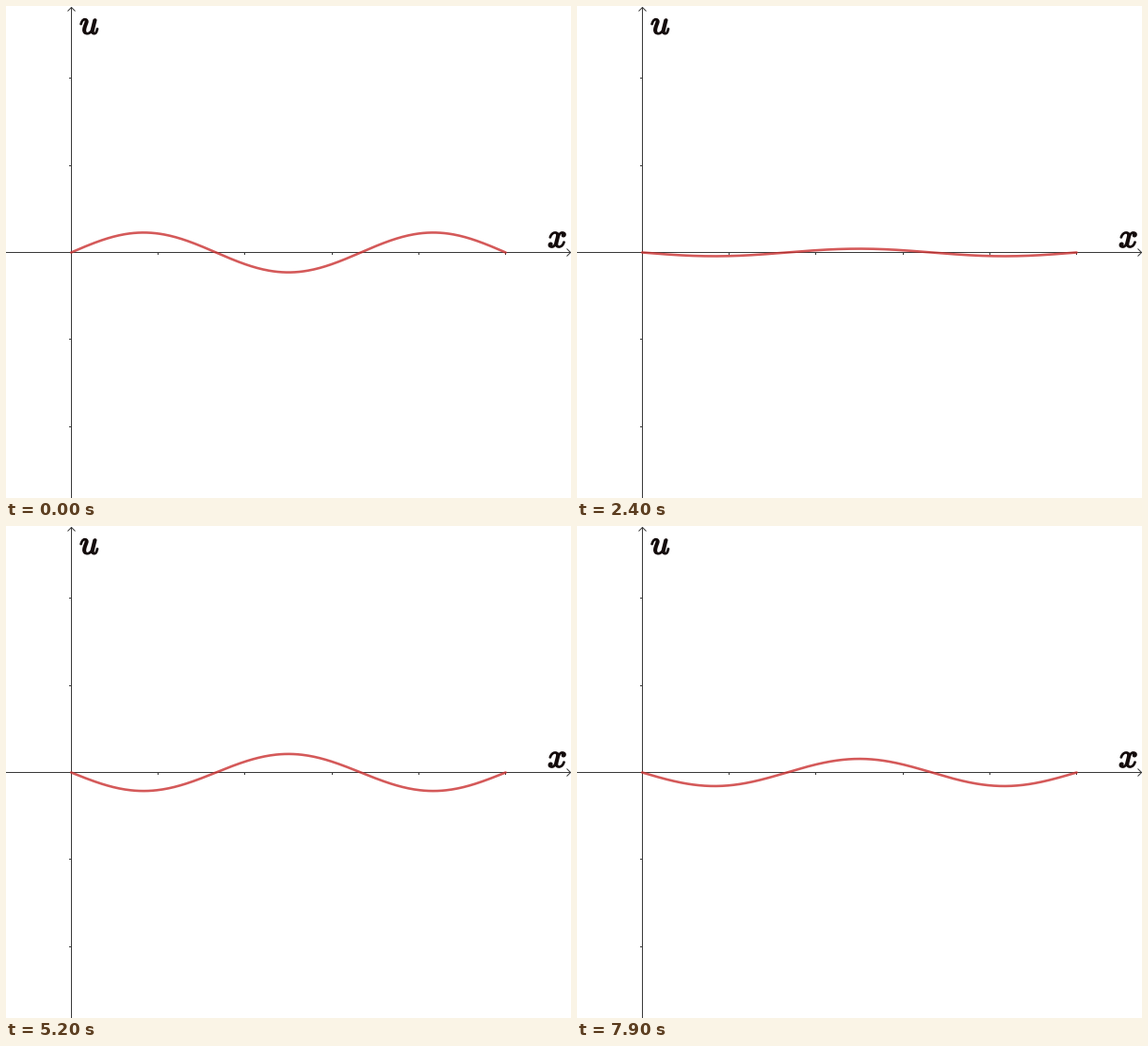
These frames come from a looping animation (600x522 px, 8000 ms). A matplotlib script:

```python
import matplotlib.pyplot as plt
import numpy as np
from matplotlib.animation import FuncAnimation
from matplotlib.patches import PathPatch
from matplotlib.path import Path
from matplotlib.textpath import TextPath

W, H, DPI = 600, 522, 100
PX = 72 / DPI              # one pixel in points
X0, Y0 = 69.2, 261.5       # origin on the stage
UNIT = 92.28               # pixels per axis unit
LENGTH = 5 * UNIT
AMP = 21.1
OMEGA = 0.06 * np.pi       # phase step per frame
FRAMES, INTERVAL = 80, 100
INK = "#3a3a3a"

plt.rcParams["mathtext.fontset"] = "cm"
plt.rcParams["path.snap"] = False

fig = plt.figure(figsize=(W / DPI, H / DPI), dpi=DPI, facecolor="white")
ax = fig.add_axes([0, 0, 1, 1])
ax.set_xlim(0, W)
ax.set_ylim(H, 0)
ax.axis("off")


def mid(v):
    """Centre of the pixel that holds v."""
    return np.floor(v) + 0.5


def stroke(xs, ys, width=1.0, color=INK, cap="butt", **kw):
    return ax.plot(xs, ys, color=color, lw=width * PX,
                   solid_capstyle=cap, **kw)[0]


def label(letter, cx, cy, size=35.5):
    """Bold italic math letter with its ink centred on (cx, cy)."""
    glyph = TextPath((0, 0), f"${letter}$", size=size)
    verts = glyph.vertices * [1, -1]
    box = Path(verts, glyph.codes).get_extents()
    verts = verts + [cx - (box.x0 + box.x1) / 2, cy - (box.y0 + box.y1) / 2]
    ax.add_patch(PathPatch(Path(verts, glyph.codes), fc="#140c0c",
                           ec="#140c0c", lw=1.7 * PX, zorder=4))


# Axes with open arrowheads
ax_x, ax_y = mid(X0), mid(Y0)
stroke([0, W], [ax_y, ax_y])
stroke([ax_x, ax_x], [1, H])
stroke([W - 4.5, W - 0.5, W - 4.5], [ax_y - 4, ax_y, ax_y + 4])
stroke([ax_x - 4, ax_x, ax_x + 4], [5.5, 1.5, 5.5])

# Ticks
for k in range(1, 6):
    x = mid(X0 + k * UNIT)
    stroke([x, x], [ax_y, ax_y + 2.5])
for k in (-2, -1, 1, 2):
    y = mid(Y0 - k * UNIT)
    stroke([ax_x - 2.5, ax_x], [y, y])

label("u", 88.3, 21.7)
label("x", 585.2, 248.0)

# Standing wave: third mode of a string with fixed ends
xs = np.linspace(0, LENGTH, 300)
mode = np.sin(3 * np.pi * xs / LENGTH)
wave = stroke(X0 + xs, Y0 - AMP * mode, 2.6, "#ca3030", cap="round",
              alpha=0.8, zorder=3)


def update(i):
    wave.set_ydata(Y0 - AMP * np.cos(OMEGA * i) * mode)
    return (wave,)


anim = FuncAnimation(fig, update, frames=FRAMES, interval=INTERVAL,
                     repeat=True, repeat_delay=0)
plt.show()
```
